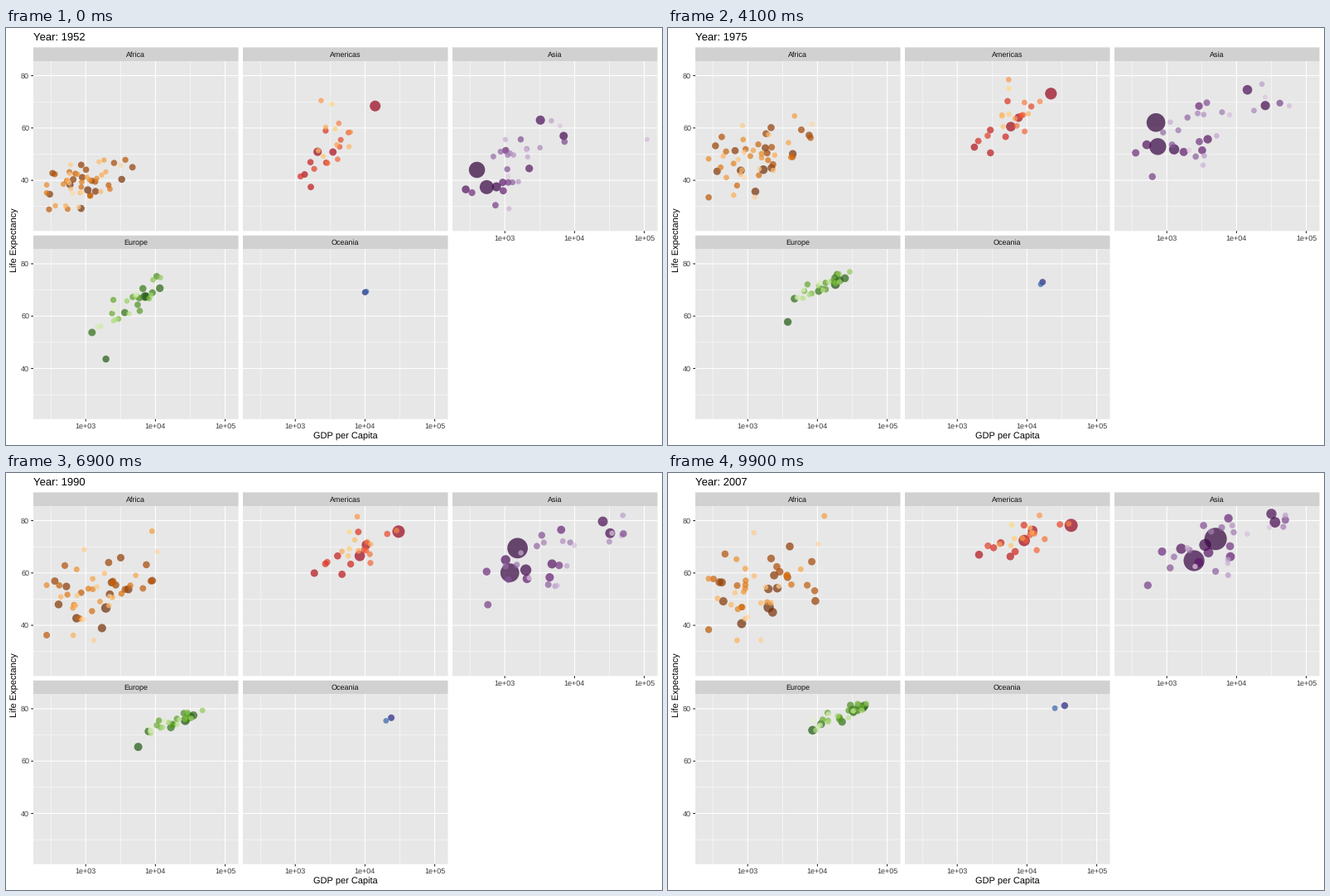
These frames come from a looping animation (792 by 504 pixels, 10 s). A matplotlib script:

```python
import numpy as np
import matplotlib.pyplot as plt
from matplotlib.animation import FuncAnimation
from matplotlib.collections import LineCollection
from matplotlib.colors import to_rgb
from matplotlib.patches import Rectangle

plt.rcParams.update({"font.family": "Liberation Sans", "text.hinting": "none",
                     "text.hinting_factor": 1, "toolbar": "None"})

W, H, FRAMES = 792, 504, 100
PANEL_W, PANEL_H, STRIP = 247.5, 205.3, 16.6
COLS = [33, 286, 539]
ROWS = [40, 267.4]
X_MIN, X_MAX = 2.2487, 5.1887
Y_MIN, Y_MAX = 20.649, 85.553

FIRST, LAST = 1952, 2007
SURVEYS = np.linspace(0, 1, 12)  # one every five years, straight moves between
TIMES = np.linspace(0, 1, FRAMES)

# Triples are values at the start, middle and end of the period.
# crowd: number of dots, log GDP, life, their spreads, correlation
# pop: largest of the crowd in millions, decay by rank, share at the start
# leads: log GDP, life, population at start and end
REGIONS = [
    dict(name="Africa", col=0, row=0, seed=4,
         ramp=["#7F3B08", "#B35806", "#E08214", "#FDB863", "#FEE0B6"],
         crowd=(50, (2.94, 3.12, 3.15), (39, 50.4, 55), (.29, .40, .45), (5, 7.5, 9.5), .4),
         pop=(80, .085, .33),
         leads=[((3.03, 3.25, 3.30), (36.3, 45.1, 46.9), (33, 135)),
                ((3.67, 3.91, 3.97), (45, 58, 49.3), (14, 44))]),
    dict(name="Americas", col=1, row=0, seed=8,
         ramp=["#A50026", "#D73027", "#F46D43", "#FDAE61", "#FEE090"],
         crowd=(22, (3.47, 3.78, 3.92), (53, 65.3, 73.4), (.2, .25, .31), (9, 6.5, 4.2), .6),
         pop=(45, .16, .35),
         leads=[((4.146, 4.385, 4.633), (68.4, 74, 78.2), (158, 301)),
                ((3.32, 3.83, 3.96), (50.9, 62.4, 72.4), (57, 190)),
                ((3.54, 3.93, 4.08), (50.8, 66.2, 76.2), (30, 109))]),
    dict(name="Asia", col=2, row=0, seed=3,
         ramp=["#40004B", "#762A83", "#9970AB", "#C2A5CF", "#E7D4E8"],
         crowd=(28, (3.16, 3.58, 3.77), (46.7, 61.5, 70.8), (.34, .54, .55), (8.5, 8.5, 7.5),
                .65),
         pop=(150, .17, .35),
         leads=[((2.60, 2.93, 3.70), (44, 64.8, 73), (556, 1319)),
                ((2.74, 2.92, 3.39), (37.4, 55.4, 64.7), (372, 1110)),
                ((2.88, 3.16, 3.55), (37.5, 54.7, 70.7), (82, 224)),
                ((3.51, 4.25, 4.50), (63, 76.4, 82.6), (86, 127)),
                ((5.04, 4.72, 4.67), (55.6, 70.5, 77.6), (.2, 2.5))]),
    dict(name="Europe", col=0, row=1, seed=6,
         ramp=["#276419", "#4D9221", "#7FBC41", "#B8E186", "#E6F5D0"],
         crowd=(28, (3.66, 4.14, 4.36), (65, 72.7, 77.8), (.27, .22, .25), (5, 2.3, 2.7), .85),
         pop=(61, .16, .72),
         leads=[((3.85, 4.32, 4.51), (67.5, 73.1, 79.4), (69, 82)),
                ((3.29, 3.63, 3.93), (43.6, 60.3, 71.8), (22, 71))]),
    dict(name="Oceania", col=1, row=1, ramp=["#313695", "#4575B4"],
         leads=[((4.00, 4.27, 4.54), (69.1, 74, 81.2), (8.7, 20.4)),
                ((4.02, 4.23, 4.40), (69.4, 73, 80.2), (2, 4.1))]),
]


def bend(start, middle, end):
    """Parabola through three values, taken at every survey."""
    s = SURVEYS
    return start + (4 * middle - 3 * start - end) * s + 2 * (start - 2 * middle + end) * s**2


def drift(rng, n):
    """Standard scores that wander slowly from one seeded draw towards another."""
    a, b = np.clip(rng.normal(size=(2, n, 1)), -2, 2)
    z = a + (0.75 * a + 0.65 * b - a) * SURVEYS + rng.normal(0, 0.09, (n, len(SURVEYS)))
    return (z - z.mean(axis=0)) / z.std(axis=0)


def scatter_crowd(seed, crowd, pop):
    n, gdp, life, gdp_sd, life_sd, corr = crowd
    rng = np.random.default_rng(seed)
    u, v = drift(rng, n), drift(rng, n)
    x = bend(*gdp) + bend(*gdp_sd) * u
    y = bend(*life) + bend(*life_sd) * (corr * u + np.sqrt(1 - corr**2) * v)
    largest, decay, share = pop
    last = largest * np.exp(-decay * np.arange(n))
    return np.clip(x, 2.44, 4.7), np.clip(y, 28, 82), np.column_stack([last * share, last])


def build(region):
    leads = region["leads"]
    x = np.array([bend(*gdp) for gdp, _, _ in leads])
    y = np.array([bend(*life) for _, life, _ in leads])
    pop = np.array([p for _, _, p in leads])
    if "crowd" in region:
        more = scatter_crowd(region["seed"], region["crowd"], region["pop"])
        x, y, pop = (np.vstack(pair) for pair in zip((x, y, pop), more))
    return x, y, pop


def tween(rows):
    return np.array([np.interp(TIMES, SURVEYS, r) for r in rows])


def px(log_gdp):
    return (log_gdp - X_MIN) / (X_MAX - X_MIN) * PANEL_W


def py(life):
    return (Y_MAX - life) / (Y_MAX - Y_MIN) * PANEL_H


def tone(color):
    """Darken the mid tones as an older display profile does."""
    return np.array(to_rgb(color)) ** 1.222


def shades(stops, pop):
    """Colour by rank, the most populous first."""
    rank = np.argsort(np.argsort(-pop))
    at = rank / (len(pop) - 1) * (len(stops) - 1)
    rgb = np.array([to_rgb(s) for s in stops])
    mix = [np.interp(at, range(len(stops)), rgb[:, c]) for c in range(3)]
    return np.array(mix).T ** 1.222


def diameter(pop):
    size = 2 + 10 * np.sqrt(pop / 1319)
    return 0.75 * (2.845 * size + 0.945) + 0.7


fig = plt.figure(figsize=(W / 72, H / 72), dpi=72, facecolor="white")
ax = fig.add_axes([0, 0, 1, 1])
ax.set(xlim=(0, W), ylim=(H, 0))
ax.axis("off")

GREY10, GREY20, GREY30 = tone("#1A1A1A"), tone("#333333"), tone("#4D4D4D")


def box(x, y, w, h, color):
    ax.add_patch(Rectangle((x, y), w, h, fc=color, lw=0, zorder=1, snap=False))


def lines(segments, width, color, z):
    ax.add_collection(LineCollection(segments, linewidths=width, colors=[color], zorder=z,
                                     capstyle="butt", snap=False), autolim=False)


def label(x, y, text, size=8.8, color=GREY30, ha="center", **kw):
    return ax.text(x, y, text, size=size, color=color, ha=ha, va="baseline", **kw)


def grid(x, y, xs, ys, width, z):
    lines([[(x + px(v), y), (x + px(v), y + PANEL_H)] for v in xs]
          + [[(x, y + py(v)), (x + PANEL_W, y + py(v))] for v in ys], width, "white", z)


def panel(name, x, y):
    box(x, y - STRIP, PANEL_W, STRIP, tone("#D9D9D9"))
    box(x, y, PANEL_W, PANEL_H, tone("#EBEBEB"))
    grid(x, y, [2.5, 3.5, 4.5], [30, 50, 70], 0.53, 2)
    grid(x, y, [3, 4, 5], [40, 60, 80], 1.07, 3)
    label(x + PANEL_W / 2, y - 5.1, name, color=GREY10)


def x_axis(x, y):
    y += PANEL_H
    lines([[(x + px(v), y), (x + px(v), y + 2.75)] for v in (3, 4, 5)], 1.07, GREY20, 3)
    for v in (3, 4, 5):
        label(x + px(v), y + 11.3, f"1e+0{v}")


def y_axis(x, y):
    lines([[(x - 2.75, y + py(v)), (x, y + py(v))] for v in (40, 60, 80)], 1.07, GREY20, 3)
    for v in (40, 60, 80):
        label(x - 4.95, y + py(v) + 3.1, str(v), ha="right")


clouds = []
for region in REGIONS:
    col, row = region["col"], region["row"]
    left, top = COLS[col], ROWS[row]
    panel(region["name"], left, top)
    if row == 1 or col == 2:
        x_axis(left, top)
    if col == 0:
        y_axis(left, top)
    gdp, life, pop = build(region)
    paths = np.stack([left + px(tween(gdp)), top + py(tween(life))], axis=-1)
    dots = ax.scatter(*paths[:, 0].T, c=shades(region["ramp"], pop[:, 1]), alpha=0.7,
                      linewidths=0, zorder=4)
    clouds.append((dots, paths, diameter(pop).T))

title = label(33, 15, "", size=13.2, color="black", ha="left")
label(409.75, 497, "GDP per Capita", size=11, color="black")
label(13.4, 256.4, "Life Expectancy", size=11, color="black",
      rotation=90, rotation_mode="anchor")


def draw(i):
    t = TIMES[i]
    title.set_text(f"Year: {round(FIRST + (LAST - FIRST) * t)}")
    for dots, paths, (small, big) in clouds:
        dots.set_offsets(paths[:, i])
        dots.set_sizes((small + (big - small) * t) ** 2)


anim = FuncAnimation(fig, draw, frames=FRAMES, interval=100, repeat=True)
plt.show()
```
